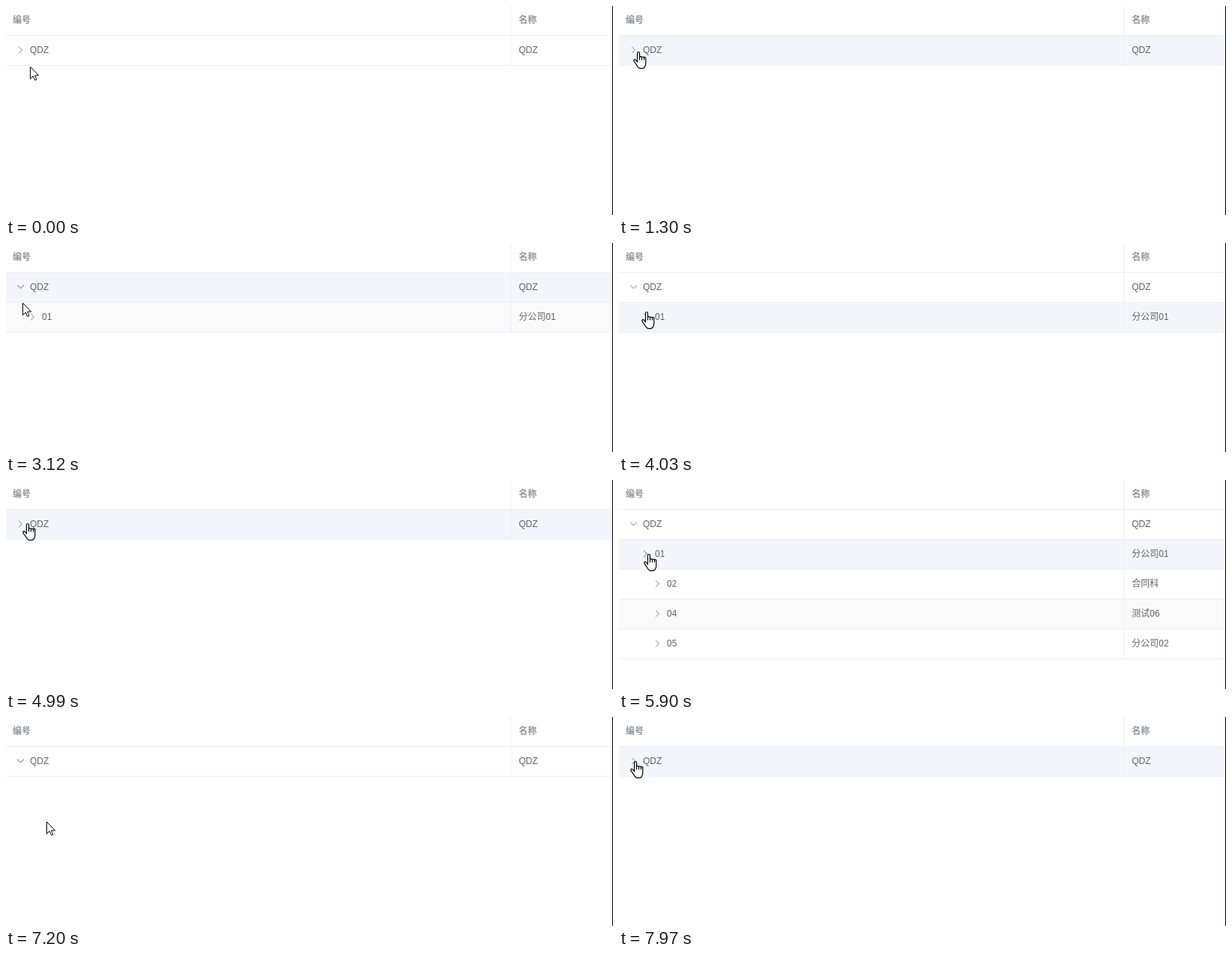
Write an HTML page that moves like this. It is 812 by 280 pixels and loops after 8 s.

```html
<!DOCTYPE html>
<html lang="zh">
<head>
<meta charset="utf-8">
<title>Tree table</title>
<style>
html, body { margin: 0; width: 100%; height: 100%; overflow: hidden; background: #fff; }
svg { display: block; }
text { font: 12px "Liberation Sans", "Noto Sans CJK SC", "Noto Sans CJK", sans-serif; fill: #606266; }
.head { font-weight: bold; fill: #909399; }
.line { fill: #ebeef5; }
.chev { fill: none; stroke: #808389; }
.cur { fill: #fff; stroke: #000; stroke-linejoin: round; }
</style>
</head>
<body>
<svg width="812" height="280" viewBox="0 0 812 280">
  <g id="table"></g>
  <g id="hand" class="cur" stroke-width="1.2">
    <path d="M5.5 14V2a1.5 1.5 0 0 1 3 0V7.5a1.6 1.5 0 0 1 3 .3a1.6 1.5 0 0 1 3 .7a1.2 1.2 0 0 1 2.3 1V15.5C16.8 19.5 14.8 22.7 12 22.7H10C7 22.7 5.5 20 4.2 17.5L1 12.8Q.3 10.8 2 10.6Q3.5 10.8 5.5 14Z"/>
    <path fill="none" d="M8.5 7.5V11.5M11.5 8V11.5M14.5 8.5V11.5"/>
  </g>
  <path id="arrow" class="cur" d="M.5 .5V16.5L4.3 12.9L6.7 18.5L9 17.5L6.6 12H11.7Z"/>
  <rect x="811" width="1" height="280" fill="#000"/>
</svg>
<script>
const LOOP = 8000, ROW = 40, FADE = 250, TURN = 300, SAMPLES = 16;
const $ = id => document.getElementById(id);

// A row shows while all its ancestors are open; each click toggles its row.
const root = { code: "QDZ", name: "QDZ", clicks: [2880, 4610, 5100, 7200] };
const branch = { code: "01", name: "分公司01", parent: root, clicks: [5900] };
const leaf = (code, name) => ({ code, name, parent: branch, clicks: [] });
const rows = [root, branch, leaf("02", "合同科"), leaf("04", "测试06"), leaf("05", "分公司02")];

// Pointer stops: [arrival time, x, y]
const stops = [
  [0, 32, 81], [770, 24, 60], [1300, 26, 61], [2060, 36, 66], [2640, 26, 64],
  [3120, 22, 80], [3600, 40, 101], [4370, 26, 60], [4990, 29, 58],
  [5710, 40, 99], [6480, 26, 61], [7200, 54, 140], [7970, 22, 59]
];

const clamp = p => Math.max(0, Math.min(1, p));
const ease = p => 1 - Math.pow(1 - clamp(p), 2.4);
const glide = p => { p = clamp(p); return p * p * (3 - 2 * p); };

const isOpen = (r, t) => r.clicks.filter(c => c <= t).length % 2 === 1;
const isShown = (r, t) => !r.parent || (isOpen(r.parent, t) && isShown(r.parent, t));
const depth = r => r.parent ? 1 + depth(r.parent) : 0;

function add(parent, tag, attrs, label) {
  const el = document.createElementNS("http://www.w3.org/2000/svg", tag);
  for (const k in attrs) el.setAttribute(k, attrs[k]);
  if (label) el.textContent = label;
  parent.appendChild(el);
  return el;
}

function addLine(g, y, first, second, x, cls) {
  add(g, "rect", { class: "line", y: y + ROW - 1, width: 811, height: 1 });
  add(g, "rect", { class: "line", x: 675, y, width: 1, height: ROW });
  add(g, "text", { class: cls, x, y: y + 23 }, first);
  add(g, "text", { class: cls, x: 686, y: y + 23 }, second);
}

function build() {
  addLine($("table"), 0, "编号", "名称", 9, "head");
  rows.forEach((r, i) => {
    const y = ROW * (i + 1), box = { y, width: 811, height: ROW };
    r.cx = 19.5 + 16 * depth(r);
    r.cy = y + 19;
    r.g = add($("table"), "g", {});
    add(r.g, "rect", { ...box, fill: i % 2 ? "#fafafa" : "#fff" });
    r.tint = add(r.g, "rect", { ...box, fill: "#f4f5fa" });
    r.chev = add(r.g, "path", { class: "chev", d: "M-2.4 -4.5L1.9 0L-2.4 4.5" });
    addLine(r.g, y, r.code, r.name, r.cx + 12.5, "cell");
  });
}

// Short moves are quick, long ones take up to 480 ms.
function pointer(t) {
  let [, x, y] = stops[0];
  for (const [end, nx, ny] of stops.slice(1)) {
    const time = Math.min(480, 25 * Math.hypot(nx - x, ny - y));
    if (t <= end - time) break;
    const p = glide((t - end + time) / time);
    x += (nx - x) * p;
    y += (ny - y) * p;
    if (t < end) break;
  }
  return [x, y];
}

function hovered(t) {
  const r = rows[Math.floor(pointer(t)[1] / ROW) - 1];
  return r && isShown(r, t) ? r : null;
}

// Share of the last moments in which the pointer was on the row
function hoverLevel(r, t) {
  let n = 0;
  for (let k = 0; k < SAMPLES; k++) n += hovered(t - FADE * k / SAMPLES) === r;
  return ease(n / SAMPLES);
}

const angle = (r, t) =>
  r.clicks.reduce((a, c, k) => a + (k % 2 ? -90 : 90) * ease((t - c) / TURN), 0);

function draw(t) {
  for (const r of rows) {
    r.g.setAttribute("display", isShown(r, t) ? "inline" : "none");
    r.tint.setAttribute("opacity", hoverLevel(r, t));
    r.chev.setAttribute("transform", `translate(${r.cx} ${r.cy}) rotate(${angle(r, t)})`);
  }
  const [x, y] = pointer(t).map(Math.round);
  const r = hovered(t);
  const onChevron = r && Math.abs(x - r.cx) < 13 && Math.abs(y - r.cy) < 15;
  $("hand").setAttribute("display", onChevron ? "inline" : "none");
  $("arrow").setAttribute("display", onChevron ? "none" : "inline");
  $("hand").setAttribute("transform", `translate(${x - 7} ${y})`);
  $("arrow").setAttribute("transform", `translate(${x} ${y})`);
}

build();
const start = performance.now();
function tick() {
  draw((performance.now() - start) % LOOP);
  requestAnimationFrame(tick);
}
tick();
</script>
</body>
</html>
```
